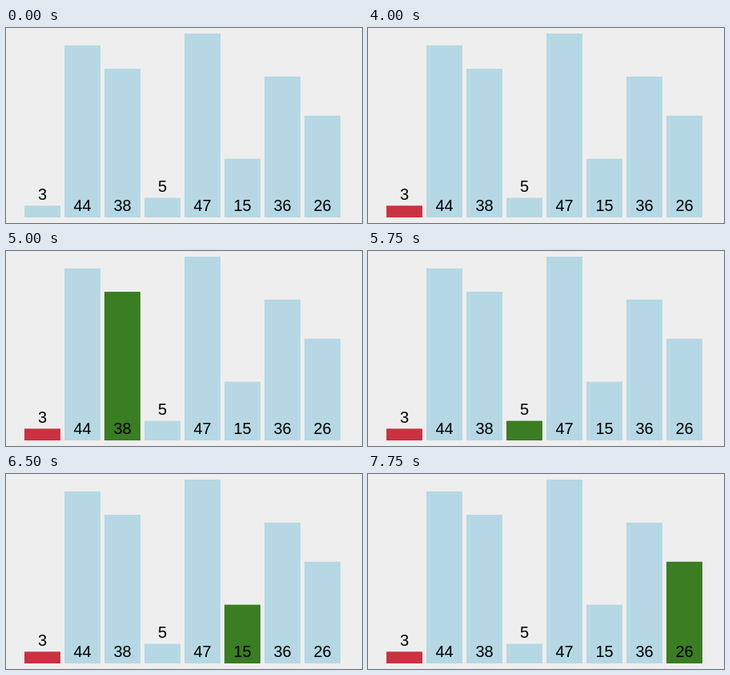
Animation, 445 px wide and 244 px high, one loop 8000 ms. Source, as an HTML page:

```html
<!DOCTYPE html>
<html lang="en">
<head>
<meta charset="utf-8">
<title>Selection sort</title>
<style>
html, body { margin: 0; width: 100%; height: 100%; overflow: hidden; background: #eee; }
svg { display: block; }
text { font: 20px "Liberation Sans", Helvetica, Arial, sans-serif; text-anchor: middle; }
</style>
</head>
<body>
<svg id="stage" width="445" height="244" viewBox="0 0 445 244">
  <path id="pointer" d="M434.8 31V45.2L438 42.2L440.3 47.4L442.6 46.4L440.4 41.3H444.6Z" stroke="#fff"/>
</svg>
<script>
const LOOP = 8000, SCAN_START = 4000, STEP = 500;
const FLOOR = 237, UNIT = 230 / 47;
const IDLE = "#b6d8e4", MINIMUM = "#cb3140", SCANNED = "#3a7d22";
const stage = document.getElementById("stage");
const pointer = document.getElementById("pointer");

function add(tag, attributes) {
  const node = document.createElementNS("http://www.w3.org/2000/svg", tag);
  for (const name in attributes) node.setAttribute(name, attributes[name]);
  return stage.insertBefore(node, pointer);
}

const bars = [3, 44, 38, 5, 47, 15, 36, 26].map((value, i) => {
  const x = 23 + 50 * i, height = value * UNIT, top = FLOOR - height;
  const bar = add("rect", { x, y: top, width: 45, height });
  // Labels of short bars sit above them.
  const y = height < 30 ? top - 7.3 : 229.3;
  add("text", { x: x + 22.5, y }).textContent = value;
  return bar;
});

function draw(time) {
  const step = Math.floor((time - SCAN_START) / STEP);
  bars.forEach((bar, i) => {
    const color = step < 0 ? IDLE : i === 0 ? MINIMUM : i === step ? SCANNED : IDLE;
    bar.setAttribute("fill", color);
  });
  pointer.setAttribute("visibility", time >= 750 && time < 1000 ? "visible" : "hidden");
}

const start = performance.now();
function tick() {
  draw((performance.now() - start) % LOOP);
  requestAnimationFrame(tick);
}
tick();
</script>
</body>
</html>
```
